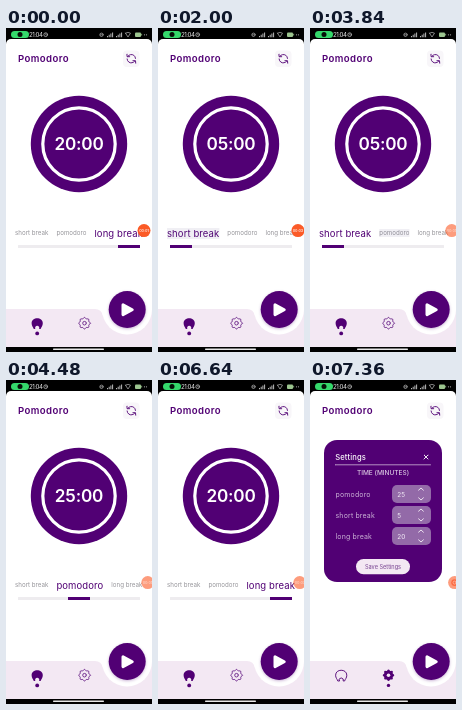
An HTML page with a canvas for the animation above (8000 ms loop, 146x324 px).

```html
<!DOCTYPE html>
<html lang="en">
<head>
<meta charset="utf-8">
<title>Pomodoro</title>
<style>
html, body { margin: 0; width: 100%; height: 100%; overflow: hidden; background: #fff; }
canvas { display: block; width: 146px; height: 324px; }
</style>
</head>
<body>
<canvas id="stage"></canvas>
<script>
const W = 146, H = 324, LOOP = 8000;
const PURPLE = '#510074', LILAC = '#f3e8f3', GREY = '#96959a';
const FONT = 'Inter, "Open Sans", sans-serif';
const canvas = document.getElementById('stage');
const ctx = canvas.getContext('2d');
const dpr = Math.max(1, window.devicePixelRatio || 1);
canvas.width = W * dpr;
canvas.height = H * dpr;

const TABS = [
  { label: 'short break', time: '05:00' },
  { label: 'pomodoro', time: '25:00' },
  { label: 'long break', time: '20:00' }
];
// Each tap lights a tab first and selects it 80 ms later.
const TAPS = [
  { at: 880, tab: 1, fade: 560 },
  { at: 1920, tab: 0, fade: 640 },
  { at: 3840, tab: 1, fade: 640 },
  { at: 5280, tab: 2, fade: 720 }
];
const GLOW = 0.09;
const MODAL_AT = 6720;

function box(x, y, w, h, r, fill) {
  ctx.fillStyle = fill;
  ctx.beginPath();
  ctx.roundRect(x, y, w, h, r);
  ctx.fill();
}

function disc(x, y, r, fill) {
  ctx.fillStyle = fill;
  ctx.beginPath();
  ctx.arc(x, y, r, 0, Math.PI * 2);
  ctx.fill();
}

function ring(x, y, r, width, color, from = 0, to = Math.PI * 2) {
  ctx.strokeStyle = color;
  ctx.lineWidth = width;
  ctx.beginPath();
  ctx.arc(x, y, r, from, to);
  ctx.stroke();
}

function line(points, width, color) {
  ctx.strokeStyle = color;
  ctx.lineWidth = width;
  ctx.beginPath();
  points.forEach(([x, y]) => ctx.lineTo(x, y));
  ctx.stroke();
}

function text(str, x, y, size, color, weight = 400, align = 'left', spacing = 0) {
  ctx.font = `${weight} ${size}px ${FONT}`;
  ctx.letterSpacing = spacing + 'px';
  ctx.textAlign = align;
  ctx.fillStyle = color;
  ctx.fillText(str, x, y);
  return ctx.measureText(str).width;
}

function ease(t, from, to) {
  const p = Math.min(1, Math.max(0, (t - from) / (to - from)));
  return p * p * (3 - 2 * p);
}

function statusBar() {
  box(0, 0, W, 20, 0, '#000');
  box(0, 11, W, 20, 5, '#fff');
  box(5, 3, 18, 7, 3.5, '#35d86b');
  disc(14, 6.5, 2.5, '#061008');
  text('21:04', 23, 9, 6.2, '#e4e4e4', 400, 'left', -0.5);
  ring(39.7, 6.7, 1.9, 0.7, '#ccc');
  line([[39.7, 5.6], [39.7, 6.9], [40.5, 6.9]], 0.5, '#ccc');
  ring(95.5, 6.8, 1.7, 0.7, '#bbb');
  line([[94.4, 6.8], [96.6, 6.8]], 0.6, '#bbb');
  for (const x of [101, 110]) {
    for (let i = 0; i < 4; i++) box(x + i * 1.7, 8 - i * 1.2, 1, 1.3 + i * 1.2, 0, '#bbb');
  }
  line([[119.5, 5.2], [122, 4.4], [124.5, 5.2], [122, 9], [119.5, 5.2]], 0.7, '#bbb');
  box(129, 4.5, 6, 4.5, 1, '#9cc58f');
  box(135.3, 5.8, 0.8, 1.8, 0, '#9cc58f');
  for (let i = 0; i < 2; i++) disc(138.5 + i * 2, 6.8, 0.6, '#aaa');
}

function header() {
  text('Pomodoro', 12, 34.4, 9.6, PURPLE, 600, 'left', 0.4);
  box(117, 22.5, 16.5, 16.5, 4, '#f8f6f9');
  ctx.save();
  ctx.translate(125.3, 30.7);
  for (let i = 0; i < 2; i++) {
    ring(0, 0, 4.2, 0.9, PURPLE, -Math.PI * 0.8, -Math.PI * 0.02);
    line([[-4.4, -4.6], [-4.2, -2], [-1.6, -2]], 0.9, PURPLE);
    ctx.rotate(Math.PI);
  }
  ctx.restore();
}

function timer(tab) {
  disc(73, 116, 48.2, PURPLE);
  ring(73, 116, 36.2, 3.2, '#fff');
  text(TABS[tab].time, 73, 122.2, 17.2, '#fff', 600, 'center', -0.2);
}

function tabs(t, active) {
  const tap = TAPS.find(k => t >= k.at && t < k.at + k.fade);
  let x = 9;
  TABS.forEach(({ label }, i) => {
    const on = i === active;
    const w = on
      ? text(label, x, 208.6, 9.5, PURPLE, 400, 'left', 0.1)
      : text(label, x, 207.4, 6.2, GREY);
    if (tap && tap.tab === i) {
      const a = GLOW * (1 - ease(t, tap.at + 160, tap.at + tap.fade));
      box(x, on ? 200 : 201, w, on ? 11 : 8, 0, `rgba(90,80,130,${a})`);
    }
    x += w + 8;
  });
  box(12, 217, 122, 3, 0.5, '#eeecef');
  box(12 + 50 * active, 217, 22, 3, 0, PURPLE);
}

function homeIcon(on) {
  const c = 31.2;
  ctx.beginPath();
  ctx.moveTo(c - 2, 301);
  ctx.lineTo(c - 3.4, 301);
  ctx.bezierCurveTo(c - 4, 299, c - 5.6, 298, c - 5.6, 295.2);
  ctx.bezierCurveTo(c - 5.6, 288.6, c + 5.6, 288.6, c + 5.6, 295.2);
  ctx.bezierCurveTo(c + 5.6, 298, c + 4, 299, c + 3.4, 301);
  ctx.lineTo(c + 2, 301);
  ctx.lineTo(c + 2, 299);
  ctx.quadraticCurveTo(c, 296.6, c - 2, 299);
  ctx.closePath();
  if (on) {
    ctx.fillStyle = PURPLE;
    ctx.fill();
    disc(c, 305.4, 1.9, PURPLE);
  } else {
    ctx.strokeStyle = PURPLE;
    ctx.lineWidth = 0.9;
    ctx.stroke();
  }
}

function gearIcon(on) {
  ctx.beginPath();
  for (let i = 0; i < 48; i++) {
    const a = i / 48 * Math.PI * 2;
    const r = 5.2 + 0.6 * Math.cos(8 * a);
    ctx.lineTo(78.5 + r * Math.cos(a), 295.2 + r * Math.sin(a));
  }
  ctx.closePath();
  if (on) {
    ctx.fillStyle = PURPLE;
    ctx.fill();
    disc(78.5, 295.2, 1.8, LILAC);
    disc(78.5, 305.4, 1.7, PURPLE);
  } else {
    ctx.strokeStyle = PURPLE;
    ctx.lineWidth = 0.75;
    ctx.stroke();
    ring(78.5, 295.2, 1.8, 0.75, PURPLE);
  }
}

function navBar(settings) {
  box(0, 281, W, 38, 0, LILAC);
  disc(121, 281.5, 25, '#fff');
  ctx.fillStyle = '#fff';
  ctx.beginPath();
  ctx.moveTo(89, 281);
  ctx.quadraticCurveTo(95.5, 281, 97, 288);
  ctx.lineTo(102, 281);
  ctx.fill();
  ctx.save();
  ctx.shadowColor = 'rgba(81,0,116,.3)';
  ctx.shadowBlur = 3 * dpr;
  ctx.shadowOffsetY = dpr;
  disc(121.2, 281.5, 18.5, PURPLE);
  ctx.restore();
  ctx.fillStyle = ctx.strokeStyle = '#fff';
  ctx.lineWidth = 3;
  ctx.beginPath();
  ctx.moveTo(117, 276.8);
  ctx.lineTo(126.2, 281.7);
  ctx.lineTo(117, 286.6);
  ctx.closePath();
  ctx.fill();
  ctx.stroke();
  homeIcon(!settings);
  gearIcon(settings);
  box(0, 319, W, 5, 0, '#000');
  box(47, 320.6, 51, 1.3, 0.6, '#e8e8e8');
}

function modal() {
  box(14, 60, 118, 142, 13, PURPLE);
  text('Settings', 25.3, 79.6, 7.6, '#fff', 500, 'left', 0.1);
  line([[114, 75], [118, 79]], 0.9, '#fff');
  line([[118, 75], [114, 79]], 0.9, '#fff');
  line([[25, 84.8], [120.5, 84.8]], 0.8, '#cdb6d7');
  text('TIME (MINUTES)', 73, 95.4, 6.5, '#d9c6e1', 500, 'center');
  const rows = [['pomodoro', 25], ['short break', 5], ['long break', 20]];
  rows.forEach(([label, value], i) => {
    const y = 105 + 21 * i;
    text(label, 25.5, y + 11.6, 7, '#cbb2d6', 400, 'left', 0.15);
    box(82, y, 39, 18, 5, '#936aa8');
    text(value, 87.3, y + 11.6, 6.4, '#f5eef8');
    for (const s of [-1, 1]) {
      line([[108.6, y + 9 + s * 3.8], [111, y + 9 + s * 6], [113.4, y + 9 + s * 3.8]], 0.9, '#f5eef8');
    }
  });
  box(46, 179, 54, 15.3, 7.6, LILAC);
  text('Save Settings', 73, 188.8, 5.6, '#75418f', 400, 'center');
}

function recorder(t) {
  const slide = ease(t, 1920, 2080), tuck = ease(t, 6960, 7360);
  const x = 138 + 3.8 * slide + 2.8 * tuck;
  ctx.globalAlpha = 1 - 0.4 * ease(t, 1920, 2880);
  disc(x, 202.6, 6.5, '#fb5a26');
  if (tuck < 1) {
    const n = 1 + Math.floor(t / 960);
    text('00:0' + n, x, 204, 3.8, '#fff', 500, 'center', -0.1);
  } else {
    disc(x, 202.6, 3.4, '#fb4d1c');
    ring(x, 202.6, 1.5, 0.8, '#ffe0d5');
  }
  ctx.globalAlpha = 1;
}

function draw(t) {
  ctx.setTransform(dpr, 0, 0, dpr, 0, 0);
  ctx.lineCap = ctx.lineJoin = 'round';
  box(0, 0, W, H, 0, '#fff');
  const active = TAPS.reduce((tab, k) => t >= k.at + 80 ? k.tab : tab, 2);
  const settings = t >= MODAL_AT;
  statusBar();
  header();
  if (settings) {
    modal();
  } else {
    timer(active);
    tabs(t, active);
  }
  navBar(settings);
  recorder(t);
}

const start = performance.now();
function tick() {
  draw((performance.now() - start) % LOOP);
  requestAnimationFrame(tick);
}
tick();
</script>
</body>
</html>
```
